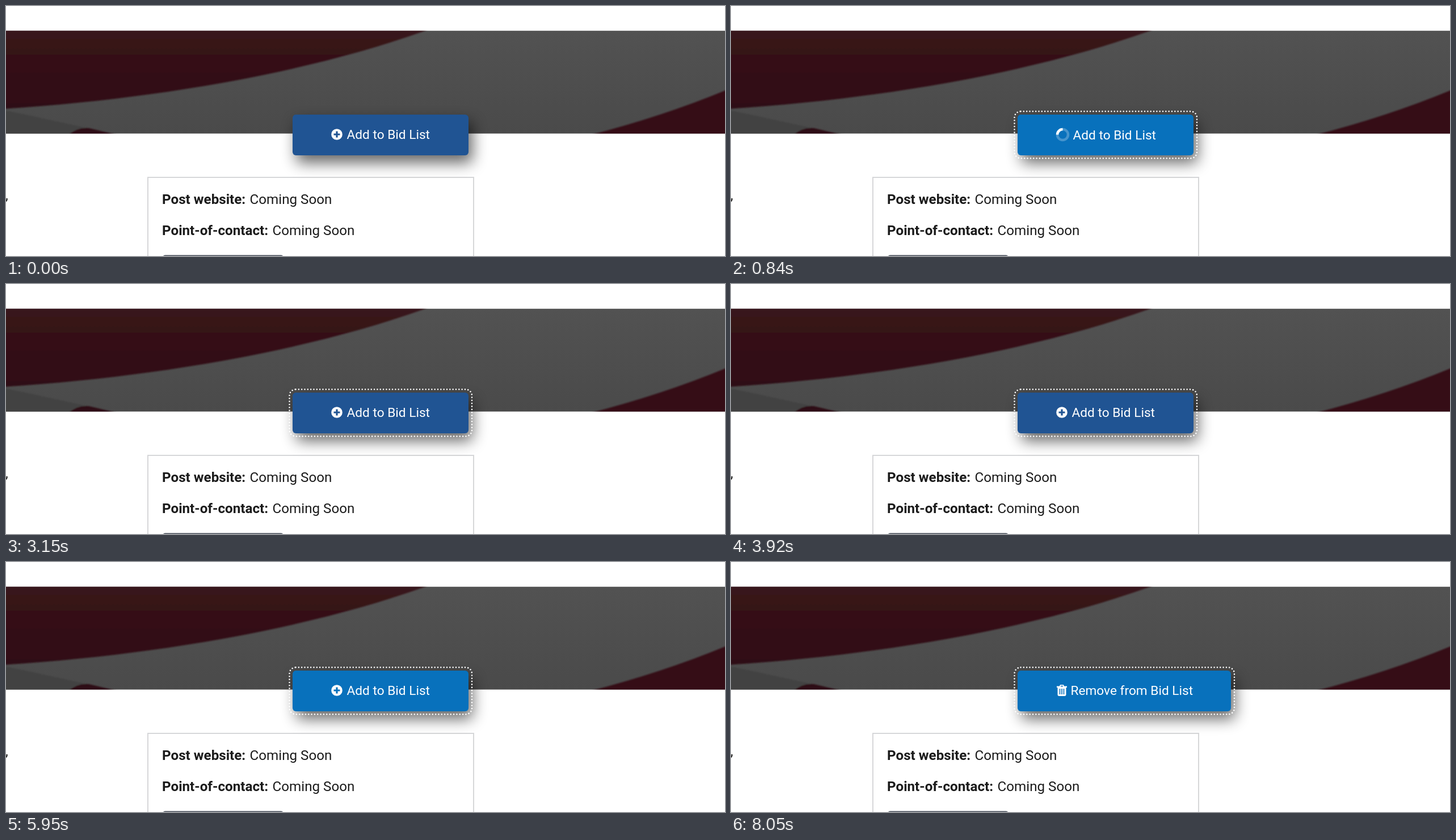
These frames come from a looping animation (1267 px wide and 442 px high, 8120 ms). An HTML page:

```html
<!DOCTYPE html>
<html lang="en">
<head>
<meta charset="utf-8">
<title>Bid list button</title>
<style>
  html, body { margin: 0; width: 100%; height: 100%; overflow: hidden; background: #fff; }
  svg { display: block; width: 1267px; height: 442px; font: 24.2px Roboto, sans-serif; fill: #1b1b1b; }
  .label { font-weight: 700; }
  .button { font-size: 22.67px; fill: #fff; }
</style>
</head>
<body>
<svg viewBox="0 0 1267 442">
  <defs>
    <linearGradient id="grey" x2="0" y2="1">
      <stop stop-color="#525252"/><stop offset="1" stop-color="#4a4a4a"/>
    </linearGradient>
    <linearGradient id="red" x2="0" y2="1">
      <stop stop-color="#3a141b"/><stop offset="1" stop-color="#2f0e14"/>
    </linearGradient>
    <filter id="blur" x="-20%" y="-80%" width="140%" height="260%"><feGaussianBlur stdDeviation="13.3"/></filter>
    <filter id="soft"><feGaussianBlur stdDeviation=".8"/></filter>
    <clipPath id="banner"><path d="M0 43.700H1267V225.600H0z"/></clipPath>
  </defs>

  <g clip-path="url(#banner)">
    <path fill="url(#grey)" d="M0 43H1267V227H0z"/>
    <g filter="url(#soft)">
      <path fill="#434343" d="M-9 183L25 190L200 228H-9z"/>
      <path fill="url(#red)" d="M-9 30V182L0 181.500C250 165 520 122 738 44L770 30z"/>
      <path fill="#2e0b12" d="M108 230Q124 214 146 216L206 230z"/>
      <path fill="#350e18" d="M1018 231Q1160 195 1280 144V231z"/>
    </g>
  </g>

  <path fill="none" stroke="#d6d7d9" stroke-width="2" d="M250 450V303H824V450"/>
  <text x="-1" y="343">,</text>
  <text x="275" y="350" class="label">Post website:</text>
  <text x="429.500" y="350">Coming Soon</text>
  <text x="275" y="405" class="label">Point-of-contact:</text>
  <text x="469.500" y="405">Coming Soon</text>
  <rect x="276.500" y="440.300" width="212" height="20" rx="4" fill="#5b616b"/>

  <g class="button">
    <rect id="shadow" x="511.700" y="205.300" height="72" rx="6" fill="#000" opacity=".6" filter="url(#blur)"/>
    <rect id="face" x="505" y="192" height="72" rx="6"/>
    <rect id="outline" x="499.500" y="186.300" height="83" rx="11" fill="none" stroke="#fff"
      stroke-width="2.600" stroke-linecap="round" stroke-dasharray="0 5.330"/>
    <g id="plus">
      <circle cx="583" cy="227" r="9.800"/>
      <path id="cross" d="M577.500 227H588.500M583 221.500V232.500" stroke-width="3.200"/>
    </g>
    <g id="spinner" fill="none" stroke="#fff" stroke-width="4.500">
      <circle cx="584.500" cy="227.500" r="9.500" opacity=".25"/>
      <path id="arc" d="M577.800 234.200A9.500 9.500 0 0 1 577.800 220.800"/>
    </g>
    <g id="trash">
      <path d="M574 219.500H579L580 217H586L587 219.500H592V222H590.500V234Q590.500 237 588 237H578Q575.500 237 575.500 234V222H574z"/>
      <path id="slots" fill="none" stroke-width="1.600" d="M579.500 224V234M583 224V234M586.500 224V234M581 219.500H585"/>
    </g>
    <text id="caption"></text>
  </g>
</svg>
<script>
  const LOOP = 8120, STEP = 70, SPIN = 1100;
  const el = id => document.getElementById(id);
  const set = (id, attrs) => {
    for (const name in attrs) el(id).setAttribute(name, attrs[name]);
  };
  const show = (id, on) => set(id, { visibility: on ? "visible" : "hidden" });

  function draw(now) {
    const t = Math.floor(now % LOOP / STEP) * STEP;
    const loading = t >= 840 && t < 1400;
    const removing = t >= 8050;
    const color = loading || t >= 4480 ? "#0871bc" : "#205493";
    const width = removing ? 376 : 310;

    set("shadow", { width });
    set("face", { width, fill: color });
    set("outline", { width: width + 11.5 });
    set("cross", { stroke: color });
    set("slots", { stroke: color });
    set("arc", { transform: `rotate(${45 + (t - 840) / SPIN * 360} 584.5 227.5)` });
    set("caption", { x: removing ? 598.5 : loading ? 602.5 : 600.5, y: loading ? 236 : 235 });
    el("caption").textContent = removing ? "Remove from Bid List" : "Add to Bid List";

    show("outline", t >= 630);
    show("spinner", loading);
    show("trash", removing);
    show("plus", !loading && !removing);
    requestAnimationFrame(() => draw(performance.now() - start));
  }

  const start = performance.now();
  draw(0);
</script>
</body>
</html>
```
